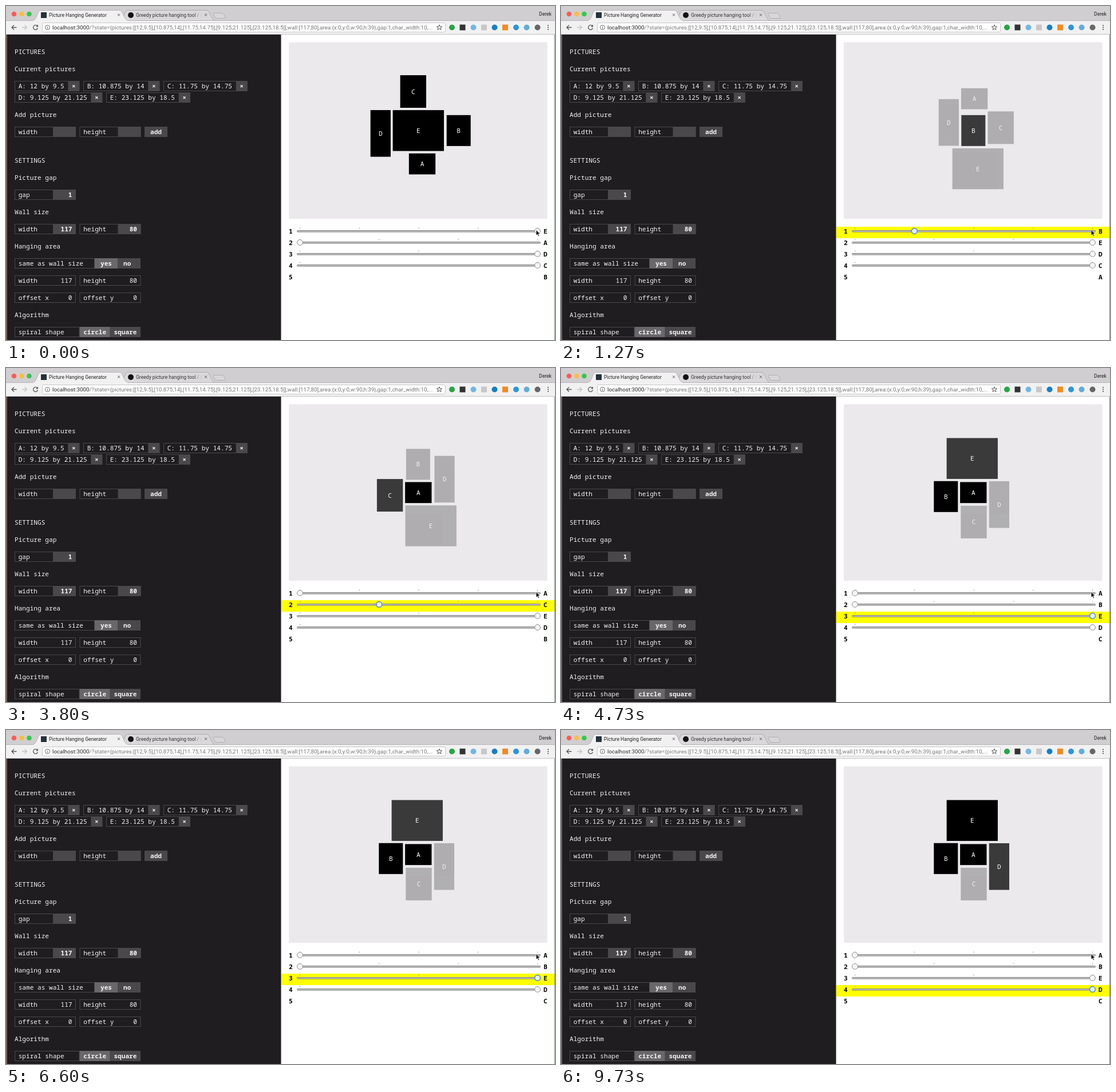
An HTML page that plays this animation: 959 by 584 pixels, repeating every 9.79 s.

```html
<!DOCTYPE html>
<html lang="en">
<head>
<meta charset="utf-8">
<title>Picture Hanging Generator</title>
<style>
  html, body { margin: 0; width: 100%; height: 100%; overflow: hidden; background: #fff; }
  svg { display: block; width: 959px; height: 584px; }
  text { font: 500 11.11px "Noto Sans Mono", "DejaVu Sans Mono", monospace; white-space: pre; }
  .bold { font-weight: 700; }
  .ui { font: 400 8.6px Roboto, sans-serif; }
  .url { font: 400 9.8px Roboto, sans-serif; }
  .mid { text-anchor: middle; }
  .end { text-anchor: end; }
</style>
</head>
<body>
<svg id="stage" viewBox="0 0 959 584">
  <defs>
    <linearGradient id="fade">
      <stop offset=".88" stop-color="#333"/>
      <stop offset="1" stop-color="#333" stop-opacity="0"/>
    </linearGradient>
    <clipPath id="tabClip"><rect x="227" y="5" width="116" height="20"/></clipPath>
  </defs>
  <rect width="959" height="584" fill="#fff"/>
  <g id="chrome">
    <rect width="959" height="26" fill="#d0ced0"/>
    <path d="M199 25.5C206 25 207 7.500 212 7.500H351C356 7.500 359 25 365 25.500Z" fill="#dad8da" stroke="#adabad"/>
    <path d="M363 12.500H377Q380 12.500 381 15L383 19.500Q383.500 21.500 381 21.500H368Q365.500 21.500 364.500 19L362 14Q361.500 12.500 363 12.500Z" fill="#d8d6d8" stroke="#b2b0b2"/>
    <rect y="25" width="959" height="25" fill="#f2f1f2"/>
    <path d="M0 25.500H47C54 25 55 7.500 60 7.500H199C204 7.500 206 25 213 25.500H959" fill="#f2f1f2" stroke="#b5b3b5"/>
    <rect x="48" y="25" width="164" height="2" fill="#f2f1f2"/>
    <path d="M0 49.500H959" stroke="#c2c0c2"/>
    <circle cx="14" cy="14" r="4.300" fill="#fc5b57"/>
    <circle cx="27.500" cy="14" r="4.300" fill="#fdbc40"/>
    <circle cx="40.500" cy="14" r="4.300" fill="#34c84a"/>
    <rect x="61" y="11" width="10" height="10" fill="#23323a"/>
    <circle cx="218" cy="16" r="5" fill="#111"/>
    <text class="ui" x="75" y="19" fill="#222">Picture Hanging Generator</text>
    <text class="ui" x="227" y="19" fill="url(#fade)" clip-path="url(#tabClip)">Greedy picture hanging tool / (</text>
    <path d="M195 13.500l4 4m0-4l-4 4M347 13.500l4 4m0-4l-4 4" stroke="#555"/>
    <text class="ui" x="931" y="17" fill="#222">Derek</text>
    <path d="M18.500 37.500H10M14 33.500L10 37.500L14 41.500" fill="none" stroke="#555" stroke-width="1.300"/>
    <path d="M28 37.500H36.500M32.500 33.500L36.500 37.500L32.500 41.500" fill="none" stroke="#c4c2c4" stroke-width="1.300"/>
    <path d="M54.800 35A4 4 0 1 0 55.500 38.500" fill="none" stroke="#555" stroke-width="1.300"/>
    <path d="M56 32.500V36.500H52Z" fill="#555"/>
    <rect x="63.500" y="29.500" width="704" height="16" rx="2" fill="#fff" stroke="#c8c6c8"/>
    <circle cx="72.500" cy="37.500" r="4" fill="none" stroke="#666"/>
    <path d="M72.500 37V40M72.500 35V36" stroke="#666"/>
    <text class="url" x="81" y="41" fill="#777"><tspan fill="#222">localhost:3000</tspan>/?state={pictures:[[12,9.5],[10.875,14],[11.75,14.75],[9.125,21.125],[23.125,18.5]],wall:[117,80],area:{x:0,y:0,w:90,h:39},gap:1,char_width:10,...</text>
    <path d="M757 32.800L758.300 36H761.700L759 38.200L760 41.500L757 39.500L754 41.500L755 38.200L752.300 36H755.700Z" fill="none" stroke="#555"/>
  </g>
  <rect x="1.500" y="50" width="479" height="534" fill="#1f1d20"/>
  <rect y="50" width="1.500" height="534" fill="#68513f"/>
  <g id="panel" fill="#f4f3f4"></g>
  <rect x="494" y="63.500" width="451.500" height="308.500" fill="#ebe9ec"/>
  <g id="pictures"></g>
  <g id="sliders"></g>
  <path d="M926 391.500V401.200L928.300 399.200L929.900 402.800L931.500 402.100L929.900 398.600H933Z" fill="#111" stroke="#fff" stroke-width=".7"/>
  <rect x="958" y="50" width="1" height="534" fill="#7a8f80"/>
</svg>
<script>
const LOOP = 9790, CHAR = 6.667, DIM = "#4a484b", LIT = "#69676a";
const $ = id => document.getElementById(id);

function add(parent, tag, attrs, text) {
  const el = document.createElementNS("http://www.w3.org/2000/svg", tag);
  for (const k in attrs) el.setAttribute(k, attrs[k]);
  if (text !== undefined) el.textContent = text;
  parent.appendChild(el);
  return el;
}

// Toolbar buttons
const chrome = $("chrome");
const dot = (x, fill) => add(chrome, "circle", { cx: x, cy: 37.5, r: 5, fill });
const square = (x, fill) => add(chrome, "rect", { x: x - 5, y: 32.5, width: 10, height: 10, fill });
dot(779, "#27a644"); square(797.5, "#333"); dot(816.5, "#72b7e3"); square(835, "#c9c7c9");
dot(853.5, "#1580c4"); square(872, "#f28a22"); dot(891, "#2b95db"); dot(909.5, "#62add9"); dot(928.5, "#666");
for (const y of [34, 37.5, 41]) add(chrome, "circle", { cx: 947, cy: y, r: 1.1, fill: "#555" });

// Settings panel
const panel = $("panel");
const write = (x, y, s, cls = "") => add(panel, "text", { x, y: y + 4, class: cls }, s);
const box = (x, y, w, fill = "none") => add(panel, "rect",
  { x: x + .5, y: y - 8.5, width: w - 1, height: 17, fill, stroke: fill === "none" ? DIM : fill });

function chip(x, y, s) {
  const w = (s.length + 2) * CHAR;
  box(x, y, w + 20);
  box(x + w, y, 20, DIM);
  write(x + CHAR, y, s);
  write(x + w + 10, y, "×", "bold mid");
  return x + w + 20 + CHAR;
}
function field(x, y, label, value, editable) {
  box(x, y, 107);
  if (editable) box(x + 67, y, 40, DIM);
  write(x + CHAR, y, label);
  write(x + 100.5, y, value, editable ? "bold end" : "end");
}
function button(x, y, s, fill) {
  const w = s.length * CHAR + (s.length > 4 ? 13.3 : 20);
  box(x, y, w, fill);
  write(x + w / 2, y, s, "bold mid");
}
function choice(y, label, x, on, off) {
  box(15, y, x - 15);
  write(21.7, y, label);
  button(x, y, on, LIT);
  button(off === "no" ? x + 40 : x + 53.3, y, off, DIM);
  if (off === "no") box(228, y, 7, DIM);
}

const headings = { 80: "PICTURES", 110: "Current pictures", 190: "Add picture", 270: "SETTINGS",
  300: "Picture gap", 360: "Wall size", 420: "Hanging area", 540: "Algorithm" };
for (const y in headings) write(15, +y, headings[y]);

let x = chip(15, 140, "A: 12 by 9.5");
x = chip(x, 140, "B: 10.875 by 14");
chip(x, 140, "C: 11.75 by 14.75");
x = chip(15, 160, "D: 9.125 by 21.125");
chip(x, 160, "E: 23.125 by 18.5");
function pair(y, a, va, b, vb, editable) {
  field(15, y, a, va, editable);
  field(128.5, y, b, vb, editable);
}
pair(220, "width", "", "height", "", true);
button(242, 220, "add", DIM);
field(15, 330, "gap", "1", true);
pair(390, "width", "117", "height", "80", true);
choice(450, "same as wall size", 155, "yes", "no");
pair(480, "width", "117", "height", "80");
pair(510, "offset x", "0", "offset y", "0");
choice(570, "spiral shape", 128.5, "circle", "square");

// Pictures: size in inches, and centre offsets per hanging order
const SCALE = 3.863, CX = 720.3, CY = 217.8;
const sizes = { A: [12, 9.5], B: [10.875, 14], C: [11.75, 14.75], D: [9.125, 21.125], E: [23.125, 18.5] };
const layouts = {
  EADCB: [6.7, 58.3, -66, 5, -9, -68.3, 70.4, 0],
  DECBA: [-66.5, 4, 44.5, 0, 6, 72, 1, -63.3],
  CEDBA: [-8, -68.3, 44.3, 13.5, -47.8, 4, -2, 51],
  BEDCA: [8, 66.8, -43, -14.2, 47.9, -5, 1.8, -55.6],
  AEDCB: [6.7, 58.2, -45, -23.4, -.5, -51, 48.7, -9.6],
  ADECB: [45.1, 0, -22, 58.2, -49.8, -10.5, -.4, -49.4],
  ACEDB: [-49.7, 4.8, 21.9, 58.2, 45.7, -23.4, -.4, -49.4],
  ABEDC: [-48, 7, -2, -59.6, 45.1, 21, .7, 51.6],
  ABDEC: [-48, 7, 45.1, 0, -22, -59.6, .7, 51.6],
  ABCED: [-48, 7, 49.8, -6, -22, -59.6, 0, 63.5],
  ABECD: [-48, 7, -2, -59.6, 49.8, 9, 0, 63.5]
};
const pictures = {};
for (const name in sizes) {
  const [w, h] = sizes[name].map(v => v * SCALE);
  const g = add($("pictures"), "g", {});
  add(g, "rect", { x: -w / 2, y: -h / 2, width: w, height: h });
  add(g, "text", { y: 4, class: "mid", fill: "#fff" }, name);
  pictures[name] = g;
}

// Slider rows
const rows = [0, 1, 2, 3, 4].map(i => {
  const g = add($("sliders"), "g", { transform: `translate(0 ${20 * i})` });
  const mark = add(g, "rect", { x: 481, y: 386, width: 478, height: 20, fill: "#ff0" });
  add(g, "text", { x: 494, y: 398, class: "bold" }, i + 1);
  const label = add(g, "text", { x: 939, y: 398, class: "bold" });
  if (i === 4) return { mark, label };
  for (let k = 0; k < 5 - i; k++)
    add(g, "rect", { x: 513 + 415 * k / (4 - i), y: 387.5, width: 1, height: 2, fill: "#999" });
  add(g, "rect", { x: 508.5, y: 392.5, width: 425, height: 2.6, rx: 1, fill: "#c4c4c4", stroke: "#777", "stroke-width": .9 });
  const thumb = add(g, "circle", { cy: 393.5, r: 4.9 });
  return { mark, label, thumb };
});

// [time, focused row, new value]; moving a slider sends the later ones to their maximum
const events = [
  [0, -1], [100, 0], [330, 0, 3], [670, 0, 2], [1000, 0, 1], [1400, 0, 0],
  [1870, 1], [3130, 1, 2], [3500, 1, 1], [3870, 1, 0],
  [4670, 2], [5130, 2, 1], [5530, 2, 0], [6270, 2, 1], [6600, 2, 2],
  [7000, 3], [8070, 3, 0], [9070, 3, 1]
];
let picks = [4, 0, 2, 1];
const states = events.map(([time, focus, value]) => {
  if (value !== undefined)
    picks = picks.map((p, i) => i < focus ? p : i === focus ? value : 4 - i);
  const left = [..."ABCDE"];
  const order = [...picks, 0].map(p => left.splice(p, 1)[0]);
  return { time, focus, picks, order };
});

function show({ focus, picks, order }) {
  const spots = [0, 0, ...layouts[order.join("")]];
  order.forEach((name, i) => {
    const { mark, label, thumb } = rows[i], on = i === focus;
    const pic = pictures[name];
    pic.setAttribute("transform", `translate(${CX + spots[2 * i]} ${CY + spots[2 * i + 1]})`);
    pic.setAttribute("opacity", focus < 0 || i < focus ? 1 : on ? .75 : .25);
    mark.setAttribute("visibility", on ? "visible" : "hidden");
    label.textContent = name;
    if (!thumb) return;
    thumb.setAttribute("cx", 513.5 + 415 * picks[i] / (4 - i));
    thumb.setAttribute("fill", on ? "#e8f0f8" : "#f5f5f5");
    thumb.setAttribute("stroke", on ? "#5b95d2" : "#8c8c8c");
    thumb.setAttribute("stroke-width", on ? 1.8 : 1);
  });
}

let start, current;
function tick(now) {
  start ??= now;
  const t = (now - start) % LOOP;
  const state = states.findLast(s => s.time <= t);
  if (state !== current) show(current = state);
  requestAnimationFrame(tick);
}
show(states[0]);
requestAnimationFrame(tick);
</script>
</body>
</html>
```
